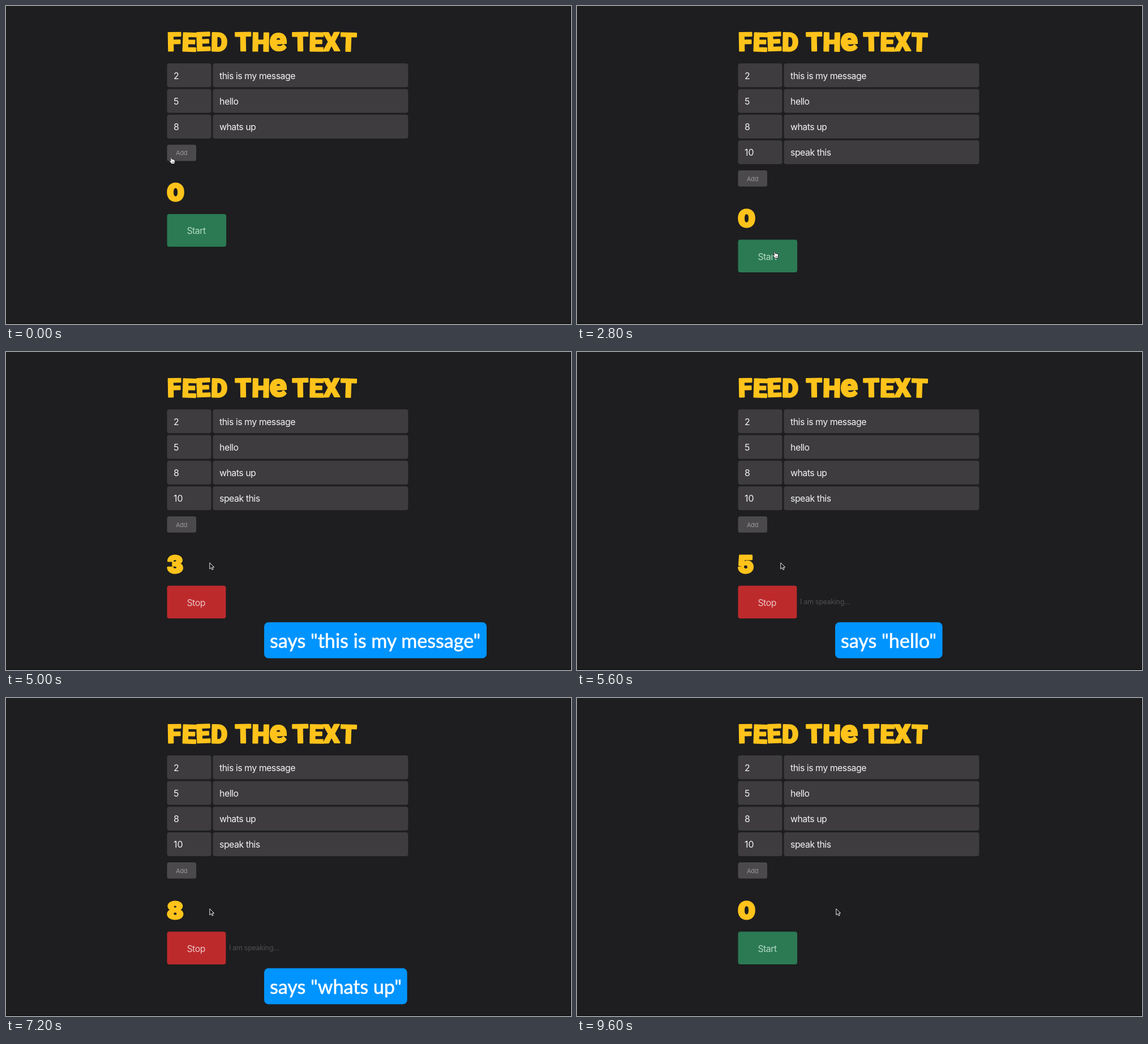
An HTML page that plays this animation: 998 by 561 pixels, repeating every 10 s.

```html
<!DOCTYPE html>
<html lang="en">
<head>
<meta charset="utf-8">
<title>Timed speech demo</title>
<style>
  html, body { margin: 0; width: 100%; height: 100%; overflow: hidden; background: #1e1e20; }
  svg { display: block; width: 998px; height: 561px; }
  text { font-family: Inter, "Open Sans", sans-serif; white-space: pre; }
  .field { fill: #3e3c3f; }
  .label { fill: #f4f4f4; font-size: 15.8px; letter-spacing: -.45px; }
  .number { letter-spacing: 0; }
  .fat { fill: #ffc31b; stroke: #ffc31b; stroke-linejoin: round; font-weight: 900; }
  .title { font-family: Roboto, "Open Sans", sans-serif; font-size: 45px; stroke-width: 2.4px; letter-spacing: .6px; }
  .count { font-size: 43px; stroke-width: 3px; }
  .small { fill: #98979a; font-size: 11px; letter-spacing: -.3px; }
  .status { fill: #4f4f52; font-size: 12.4px; letter-spacing: -.25px; }
  .caption {
    fill: #fff; stroke: #fff; stroke-width: .6px;
    font-family: Lato, "Open Sans", sans-serif; font-size: 34.1px;
  }
  .ring { fill: none; stroke: #1b4a9a; stroke-width: 2.4; }
</style>
</head>
<body>
<svg viewBox="0 0 998 561">
  <rect width="998" height="561" fill="#1e1e20"/>
  <path d="M0 560.5H997.5V0" fill="none" stroke="#0a0a0b"/>

  <text class="fat title" x="285" y="79.3" rotate="-1 2 -2 1">FEED</text>
  <text class="fat title" x="405" y="79.3" rotate="-1 1 -3">TH<tspan font-size="56">e</tspan></text>
  <text class="fat title" x="506" y="79.3" rotate="-1 1 -1 2">TEXT</text>

  <g id="rows"></g>

  <g id="extra">
    <rect id="mark" x="377" y="248.5" width="36" height="19" fill="#5c80aa"/>
    <path id="squiggle" d="M378 266.7H412" stroke="#d0586a" stroke-width="1.3" stroke-dasharray="1.5 1.5"/>
    <text id="num" class="label number" x="296" y="264.4"></text>
    <text id="msg" class="label" x="377" y="264.4"></text>
    <g id="spinner">
      <rect x="343" y="253" width="5.6" height="10.4" rx="2.6" fill="#f5f5f5"/>
      <path d="M344.6 257l1.2-1.6 1.2 1.6M344.6 259.6l1.2 1.6 1.2-1.6" fill="none" stroke="#333" stroke-width=".9"/>
    </g>
    <rect id="numRing" class="ring" x="284.4" y="237" width="78.2" height="42" rx="4"/>
    <rect id="msgRing" class="ring" x="365.8" y="237" width="344.8" height="42" rx="4"/>
  </g>

  <g id="lower">
    <rect x="284.5" y="244.8" width="51.5" height="28.6" rx="3.5" fill="#4b494c"/>
    <text class="small" x="300" y="263.4">Add</text>
    <text id="count" class="fat count" x="284.2" y="344.4"></text>
    <rect id="shade" x="284.5" y="368" width="104.5" height="57.6" rx="4" fill="#151517"/>
    <rect id="button" x="284.5" y="367.1" height="57.6" rx="4"/>
    <text id="action" class="label" x="319.4" y="402.4"></text>
    <text id="status" class="status" x="394" y="399.8">I am speaking...</text>
  </g>

  <g id="bubble">
    <rect id="box" x="456" y="476.7" height="63.6" rx="7.5" fill="#0094ff"/>
    <text id="caption" class="caption" x="466" y="521.5"></text>
  </g>

  <path id="arrow" d="M.8 .8V11.8L3.3 9.4L5.1 13.2L7 12.3L5.3 8.7H8.6Z" fill="#111" stroke="#f2f2f2" stroke-width="1" stroke-linejoin="round"/>
  <g id="hand" stroke-linejoin="round">
    <path d="M2.6 1.2Q3.6 .2 4.4 1.4L5.2 4.6Q6.4 4 7 5Q8.3 4.5 8.9 5.6Q10.4 5.3 10.6 6.8L10.7 9Q10.6 10.8 9.8 13H4.6Q3.6 10.9 1.2 8.6Q.2 7.2 1.6 6.9L3.4 8Z" fill="#fff" stroke="#111" stroke-width=".9"/>
    <path d="M5.8 8.8V11.4M7.3 8.8V11.4M8.8 8.8V11.4" stroke="#333" stroke-width=".6"/>
  </g>
</svg>

<script>
const LOOP = 10000, STEP = 200, PITCH = 45.2;
const $ = id => document.getElementById(id);

const rows = [["2", "this is my message"], ["5", "hello"], ["8", "whats up"], ["", ""]];
$("rows").innerHTML = rows.map(([n, m], i) => `
  <g id="row${i}" transform="translate(0 ${i * PITCH})">
    <rect class="field" x="284.5" y="101.3" width="78" height="42" rx="4"/>
    <rect class="field" x="365.5" y="101.3" width="344.8" height="42" rx="4"/>
    <text class="label number" x="296" y="128.8">${n}</text>
    <text class="label" x="377" y="128.8">${m}</text>
  </g>`).join("");

// Each track lists [start time, value...]; a value holds until the next start.
const typed = [[0, "yooo"], [1400, "s"], [1600, "spe"], [1800, "speak"], [2000, "speak th"], [2200, "speak this"]];
const counts = [[0, 0], [3600, 1], [4000, 2], [4600, 3], [5200, 4], [5600, 5],
  [6000, 6], [6600, 7], [7200, 8], [7600, 9], [8200, 10], [8800, 0]];
const speaking = [[0, 0], [4000, 1], [4600, .5], [4800, 0], [5600, 1], [6000, .5], [6200, 0],
  [7200, 1], [7600, .5], [7800, 0], [8200, 1], [8800, .5], [9200, .25], [9400, .1], [9600, .04]];
const bubbles = [[0, ""], [4000, "this is my message", 393], [5200, ""], [5600, "hello", 189.5],
  [6600, ""], [7200, "whats up", 252.6], [8200, "speak this", 266], [9200, ""]];
const pointer = [[0, "hand", 287.6, 265.6], [400, "arrow", 322, 262], [600, "arrow", 345, 259],
  [1000, ""], [2400, "arrow", 349, 312], [2600, "hand", 347, 420], [2800, "hand", 345, 432],
  [3600, "arrow", 358, 392], [3800, "arrow", 359, 371], [8800, "hand", 345, 432],
  [9200, "arrow", 400, 342], [9400, "arrow", 436, 358], [9600, "arrow", 457, 371]];

const at = (track, t) => track.filter(k => k[0] <= t).pop().slice(1);
const show = (id, on) => { $(id).style.display = on ? "" : "none"; };
const write = (id, s) => { $(id).textContent = s; };
const within = (t, a, b) => t >= a && t < b;

function draw(t) {
  const added = t >= 200, running = within(t, 3000, 8800);

  show("row3", added);
  show("extra", added);
  $("lower").setAttribute("transform", `translate(0 ${added ? PITCH : 0})`);

  write("num", t < 1000 ? "0" : "10");
  write("msg", at(typed, t)[0]);
  const selected = within(t, 1200, 1400);
  show("mark", selected);
  show("squiggle", selected);
  show("spinner", within(t, 600, 2400));
  show("numRing", within(t, 600, 1200));
  show("msgRing", within(t, 1200, 2800));

  write("count", at(counts, t)[0]);
  write("action", running ? "Stop" : "Start");
  $("action").style.fill = running ? "#edc5c5" : "#b3d9c4";
  $("button").setAttribute("fill", running ? "#bd2a2c" : "#2b7a53");
  $("button").setAttribute("width", running ? 103.8 : 104.5);
  show("shade", !running);
  $("status").style.opacity = at(speaking, t)[0];

  const [words, width] = at(bubbles, t);
  show("bubble", words);
  if (words) {
    $("box").setAttribute("width", width);
    write("caption", `says "${words}"`);
  }

  const [kind, x, y] = at(pointer, t);
  for (const id of ["arrow", "hand"]) {
    show(id, id === kind);
    if (id === kind) $(id).setAttribute("transform", `translate(${x} ${y})`);
  }
}

const start = performance.now();
let last = -1;
function tick() {
  const t = Math.floor((performance.now() - start) % LOOP / STEP) * STEP;
  if (t !== last) draw(last = t);
  requestAnimationFrame(tick);
}
tick();
</script>
</body>
</html>
```
